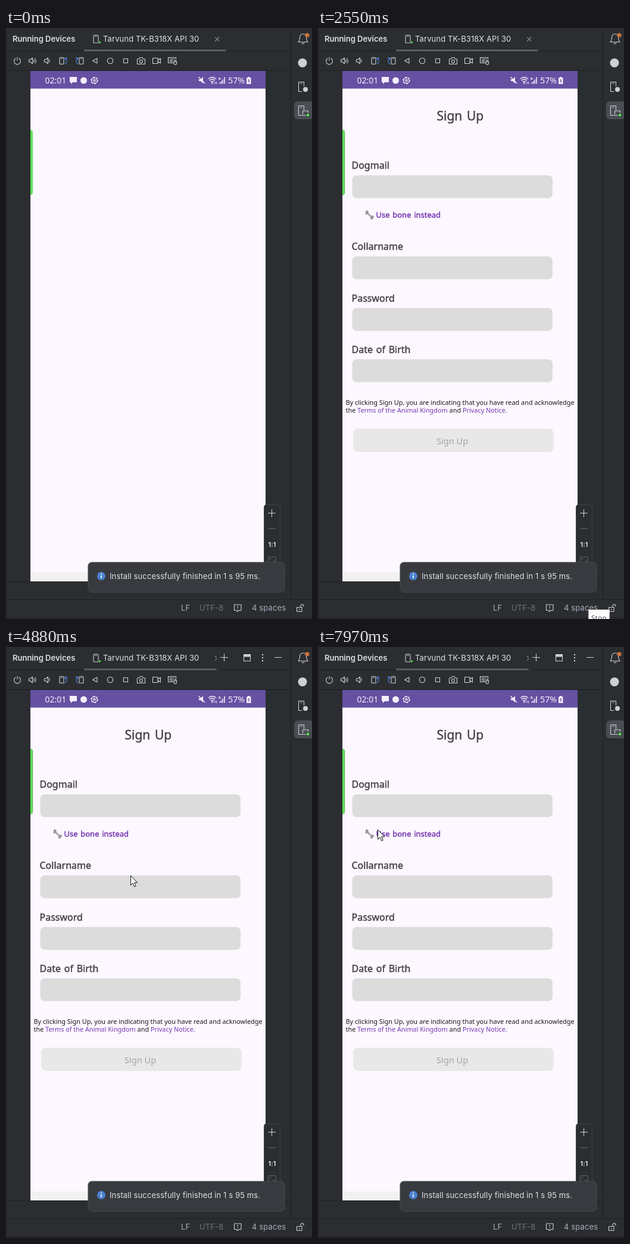
Animation, 514 px wide and 991 px high, one loop 7.99 s. Source, as an HTML page:

```html
<!DOCTYPE html>
<html lang="en">
<head>
<meta charset="utf-8">
<title>Sign up form on a mirrored device</title>
<style>
  html, body { margin: 0; width: 100%; height: 100%; overflow: hidden; background: #2b2d30; }
  svg { display: block; }
  text { white-space: pre; }
  .ide { font: 13px Inter, sans-serif; fill: #dfe1e5; letter-spacing: .12px; }
  .bold { font-weight: 600; letter-spacing: 0; }
  .dim { fill: #6f737a; }
  .bar { fill: #a8adbd; }
  .app { font-family: "Noto Sans", sans-serif; fill: #474147; }
  .medium { stroke: #474147; stroke-width: .45; word-spacing: .1em; }
  .label { font-size: 16px; }
  .small { font-size: 10.88px; fill: #1b181c; }
  .link { fill: #7439b3; }
  .medium.link { stroke: #7439b3; }
  .icon { fill: none; stroke: #ced0d6; stroke-width: 1.1; stroke-linecap: round; stroke-linejoin: round; }
  .blue { stroke: #548af7; }
  .faint { stroke: #5f6268; }
  .solid { fill: #ced0d6; stroke: none; }
  .rule { stroke: #1e1f22; fill: none; }
  .status { fill: none; stroke: #f3effa; stroke-width: 1.3; }
  .white { fill: #f3effa; stroke: none; }
</style>
</head>
<body>
<svg width="514" height="991" viewBox="0 0 514 991">
  <defs>
    <clipPath id="tabClip"><rect id="tabEdge" x="131" y="0" width="239" height="38"/></clipPath>
    <g id="handset"><rect x="-4" y="-6.5" width="8" height="13" rx="1.5"/><path d="M-1.5-4.5h3"/></g>
    <g id="speaker"><path d="M-5.5-2h2.5l3.5-3v10l-3.5-3h-2.5z"/><path d="M2.5-2q1.6 2 0 4"/></g>
    <g id="turn"><rect x="-6" y="-5.5" width="7" height="11" rx="1"/><path d="M-3.5-3.5h2"/><path class="blue" d="M3 5.5q6-4.5 1-10M3.2-1.5l.4-3.6 3.4.6"/></g>
  </defs>

  <rect width="514" height="991" fill="#2b2d30"/>
  <rect x="436" y="72" width="12" height="856" fill="#292e31"/>
  <path class="rule" d="M0 38.5H478M0 71.5H478M0 928.5H478M0 958.5H514M478.5 0V958M0 989.5H514"/>

  <!-- tabs -->
  <text class="ide bold" x="11" y="23">Running Devices</text>
  <g class="icon" transform="translate(151 18.5)"><use href="#handset"/></g>
  <circle cx="157" cy="24" r="2.3" fill="#5fdc5a" stroke="#2b2d30"/>
  <text class="ide" x="163" y="23">Tarvund TK-B318X API 30</text>
  <g clip-path="url(#tabClip)"><path class="icon" style="stroke:#868a91" d="M351.5 15.5l6.5 6.5m0-6.5l-6.5 6.5"/></g>
  <rect id="tabLine" x="131" y="36" width="239" height="3" rx="1.5" fill="#5a5d63"/>
  <g id="actions" class="icon">
    <path d="M360.500 17.500h12M366.500 11.500v12M451.500 17.500h11"/>
    <rect x="399.500" y="12.500" width="11" height="11"/>
    <path class="solid" d="M399 12h12v4.500h-12z"/>
    <g class="solid"><circle cx="431" cy="13" r="1.200"/><circle cx="431" cy="18" r="1.200"/><circle cx="431" cy="23" r="1.200"/></g>
  </g>

  <!-- device toolbar -->
  <g class="icon">
    <path d="M16 51a5.500 5.500 0 1 0 6 0M19 49v5"/>
    <g transform="translate(44 55)"><use href="#speaker"/><path d="M4.500-4q3.500 4 0 8"/></g>
    <use href="#speaker" x="70" y="55"/>
    <use href="#turn" x="96" y="55"/>
    <use href="#turn" transform="translate(124 55) scale(-1 1)"/>
    <path d="M153 51v8l-7.500-4z"/>
    <circle cx="175" cy="55" r="4.700"/>
    <rect x="197.500" y="51.500" width="7" height="7"/>
    <path d="M220.500 52h3l1.500-2.500h4l1.500 2.500h3v8.500h-13z"/><circle cx="227" cy="56" r="2.500"/>
    <path d="M246.500 50.500h8.500v9h-8.500zM255 54l4.500-3v8l-4.500-3"/>
    <path d="M281 58.500h-8.500v-9h13v3M275 52h8M275 54.500h5M275.500 56.500h4"/>
    <rect x="282" y="54.500" width="4.500" height="7" rx="2.200"/><path d="M284.200 55v2.500"/>
  </g>

  <!-- right stripe -->
  <rect x="484" y="123" width="32" height="30" rx="6" fill="#4a4d54"/>
  <g class="icon" stroke-width="1.300">
    <path d="M491 23.500h16c-3-3-2-5-2.500-8a5.500 5.500 0 0 0-11 0c-.5 3 .5 5-2.500 8zM497 25.500q2 1.500 4 0"/>
    <path d="M497 106.500h-5.500v-16h9v7M494.500 93h3"/>
    <path d="M497 146.500h-5.500v-16h9v7M494.500 133h3"/>
    <path d="M498.500 144v-5h9v3M496.500 146.500h8"/>
  </g>
  <circle cx="506" cy="12" r="3.600" fill="#c7713c"/>
  <circle cx="498" cy="58.500" r="7.500" fill="#ced0d6"/>
  <circle cx="503" cy="103" r="4" fill="#ced0d6"/>
  <circle cx="507" cy="146" r="3" fill="#5fdc5a" stroke="#2b2d30"/>

  <!-- phone -->
  <rect x="41" y="72" width="395" height="856" fill="#fdf7ff"/>
  <rect x="41" y="913" width="395" height="15" fill="#f1f1f2"/>
  <rect x="41" y="72" width="395" height="29.600" fill="#6650a2"/>
  <g class="status">
    <text class="app white" font-size="14" x="65.500" y="93">02:01</text>
    <path class="white" d="M107 82h12v9h-7l-3 3v-3h-2z"/>
    <circle class="white" cx="130.500" cy="88" r="5.500"/>
    <circle cx="148.500" cy="88" r="4.700"/><circle cx="148.500" cy="88" r="1.600"/>
    <circle cx="148.500" cy="88" r="5.600" stroke-dasharray="2.400 3.464"/>
    <path class="white" d="M324 86h3l4-4v11l-4-4h-3z"/><path d="M323.500 82l10.500 11"/>
    <path d="M340 85.500q6.500-6 13 0M342 88q4.500-4 9 0M344 90.500q2.500-2 5 0"/>
    <circle class="white" cx="346.500" cy="92.500" r="1.300"/>
    <path stroke-width="1" d="M351 90v4M353.500 94v-4"/>
    <path stroke-width="1.600" d="M359 93.500v-2M361.500 93.500v-4M364 93.500v-7M367 93.500v-11"/>
    <text class="app white" font-size="6" font-weight="700" x="357" y="86.500">R</text>
    <text class="app white" font-size="14.300" x="373" y="93">57%</text>
    <path class="white" d="M404 83.500h2v-1.500h3.500v1.500h2v10.500h-7.500z"/>
    <path d="M408.500 85l-2 3.500h2.500l-2 3.500" stroke="#6650a2" stroke-width="1"/>
  </g>

  <path id="edge" d="M41 171q4 0 4 5V275q0 5-4 5z" fill="#5fe45a"/>
  <path id="edgeDim" d="M41 171q4 0 4 4h-4zM41 262h4v13q0 5-4 5z" fill="#55b356"/>

  <g id="form" class="app">
    <path d="M41 171q3.500 0 3.500 5V275q0 5-3.500 5" fill="none" stroke="#43b544"/>
    <text class="medium" x="199.500" y="155" font-size="21">Sign Up</text>
    <g id="fields"></g>
    <g stroke="#77737a" stroke-width="2.400" stroke-linecap="round">
      <path d="M83 310l7 7.500"/>
      <g fill="#b5b1b6" stroke-width="1"><circle cx="82.300" cy="308.200" r="1.700"/><circle cx="81.500" cy="310.700" r="1.600"/><circle cx="91.500" cy="316.500" r="1.600"/><circle cx="90.300" cy="319" r="1.700"/></g>
      <path d="M83 310l7 7.500" stroke="#b5b1b6" stroke-width="1.300"/>
    </g>
    <text class="medium link" x="97.500" y="318" font-size="13">Use bone instead</text>
    <text class="small" x="46.500" y="631.500">By clicking Sign Up, you are indicating that you have read and acknowledge</text>
    <text class="small" x="46.500" y="644.500">the <tspan class="link">Terms of the Animal Kingdom</tspan> and <tspan class="link">Privacy Notice.</tspan></text>
    <rect id="lift" x="58" y="672" width="338" height="40" rx="8" fill="#dfdce0"/>
    <rect x="59" y="672" width="336.500" height="39" rx="7.500" fill="#e8e8e8"/>
    <text x="199" y="698" font-size="14.600" style="fill:#a8a3a8">Sign Up</text>
  </g>

  <!-- zoom controls -->
  <rect x="433.500" y="799.500" width="27" height="110" rx="4" fill="#2b2d30" stroke="#3f4145"/>
  <g class="icon">
    <path d="M440.500 813.500h12M446.500 807.500v12"/>
    <path class="faint" d="M440.500 839.500h12"/>
    <rect class="faint" x="440.500" y="886.500" width="13" height="12" rx="1"/>
    <path class="faint" d="M443.500 892v-2.500h2.500M450.500 892.500v2.500h-2.500"/>
  </g>
  <text class="ide" style="font-size:10.500px;font-weight:700" x="447" y="870" text-anchor="middle">1:1</text>

  <!-- notification -->
  <rect x="138" y="896" width="330" height="50" rx="6" fill="#383a3f" stroke="#484a4f"/>
  <circle cx="160" cy="919" r="7" fill="#4b80d0"/>
  <path d="M160 918v4.500M160 914.800v1.600" stroke="#fff" stroke-width="1.700"/>
  <text class="ide" x="174" y="924">Install successfully finished in 1 s 95 ms.</text>

  <!-- status bar -->
  <text class="ide bar" x="294" y="977">LF</text>
  <text class="ide dim" x="325" y="977">UTF-8</text>
  <text class="ide bar" x="413" y="977">4 spaces</text>
  <g class="icon">
    <path d="M383.500 967h11.500v9.500h-4l-2 2-2-2h-3.500zM389.200 969.500v2.500M389.200 974v.2"/>
    <rect x="488.500" y="971.500" width="8.500" height="7"/><path d="M495 971v-2q0-2.500 2.500-2.500t2.500 2.500v1M492.700 974v2"/>
  </g>

  <g id="tip">
    <rect x="454.500" y="975.500" width="35" height="22" fill="#fcfcfc" stroke="#c6c6c6"/>
    <text class="app" x="459" y="994" font-size="12" style="fill:#5b5b5b">Stop</text>
  </g>

  <path id="cursor" d="M.5.5v16l3.700-3.500 2.600 6 2.500-1.100-2.600-5.900h5z" fill="#fff" stroke="#111" stroke-width="1"/>
</svg>
<script>
  const LOOP = 7990, FORM_AT = 1300, ENTER_AT = 3620;
  const $ = id => document.getElementById(id);
  const [form, edgeDim, tip, lift, cursor, actions, tabLine, tabEdge] =
    ['form', 'edgeDim', 'tip', 'lift', 'cursor', 'actions', 'tabLine', 'tabEdge'].map($);

  $('fields').innerHTML = [['Dogmail', 247], ['Collarname', 383], ['Password', 469.5], ['Date of Birth', 555.5]]
    .map(([name, y]) => `<text class="medium label" x="56.500" y="${y - 11}">${name}</text>
      <rect x="57.500" y="${y}" width="336.500" height="38.300" rx="7.500" fill="#dcdcdc"/>`).join('');

  // pointer waypoints: time, x, y
  const path = [
    [3490, 466, 988], [3650, 447, 925], [3850, 345, 790], [3950, 262, 690], [4050, 225, 577],
    [4270, 217, 480], [4640, 115, 217], [5090, 305, 559], [5300, 331, 612], [5610, 315, 659],
    [5890, 296, 648], [6250, 200, 560], [6700, 107, 469], [6740, 87, 455], [6920, 90, 552],
    [7200, 110, 400], [7420, 123, 315], [7770, 123, 315], [7970, 100, 306]
  ];

  const clamp = v => Math.min(1, Math.max(0, v));
  const ramp = (t, from, length) => clamp((t - from) / length);
  const show = (el, on) => el.setAttribute('visibility', on ? 'visible' : 'hidden');

  // slope at a waypoint, flat at turning points so the path never overshoots
  function slope(i, axis) {
    const a = path[i - 1], b = path[i], c = path[i + 1];
    if (!a || !c) return 0;
    const m = (b[axis] - a[axis]) / (b[0] - a[0]), n = (c[axis] - b[axis]) / (c[0] - b[0]);
    return m * n <= 0 ? 0 : 2 * m * n / (m + n);
  }

  function along(t, axis) {
    const last = path.length - 1;
    if (t >= path[last][0]) return path[last][axis];
    const i = path.findIndex(p => p[0] > t) - 1;
    const p = path[i], q = path[i + 1], d = q[0] - p[0], u = (t - p[0]) / d, v = 1 - u;
    return v * v * (1 + 2 * u) * p[axis] + u * u * (3 - 2 * u) * q[axis]
      + d * u * v * (v * slope(i, axis) - u * slope(i + 1, axis));
  }

  function draw(t) {
    const ready = t >= FORM_AT, inside = t >= ENTER_AT, moving = t >= path[0][0];
    show(form, ready);
    show(edgeDim, t >= 1150 && !ready);

    show(tip, t >= 1150 && t < 3560);
    tip.setAttribute('opacity', 0.22 + 0.78 * ramp(t, 1150, 180));

    show(actions, inside);
    for (const el of [tabLine, tabEdge]) el.setAttribute('width', inside ? 223 : 239);

    lift.setAttribute('opacity', ramp(t, 3930, 100) - ramp(t, 4130, 120));

    show(cursor, moving);
    if (moving) cursor.setAttribute('transform', `translate(${Math.round(along(t, 1))} ${Math.round(along(t, 2))})`);
  }

  const start = performance.now();
  function tick() {
    draw((performance.now() - start) % LOOP);
    requestAnimationFrame(tick);
  }
  tick();
</script>
</body>
</html>
```
